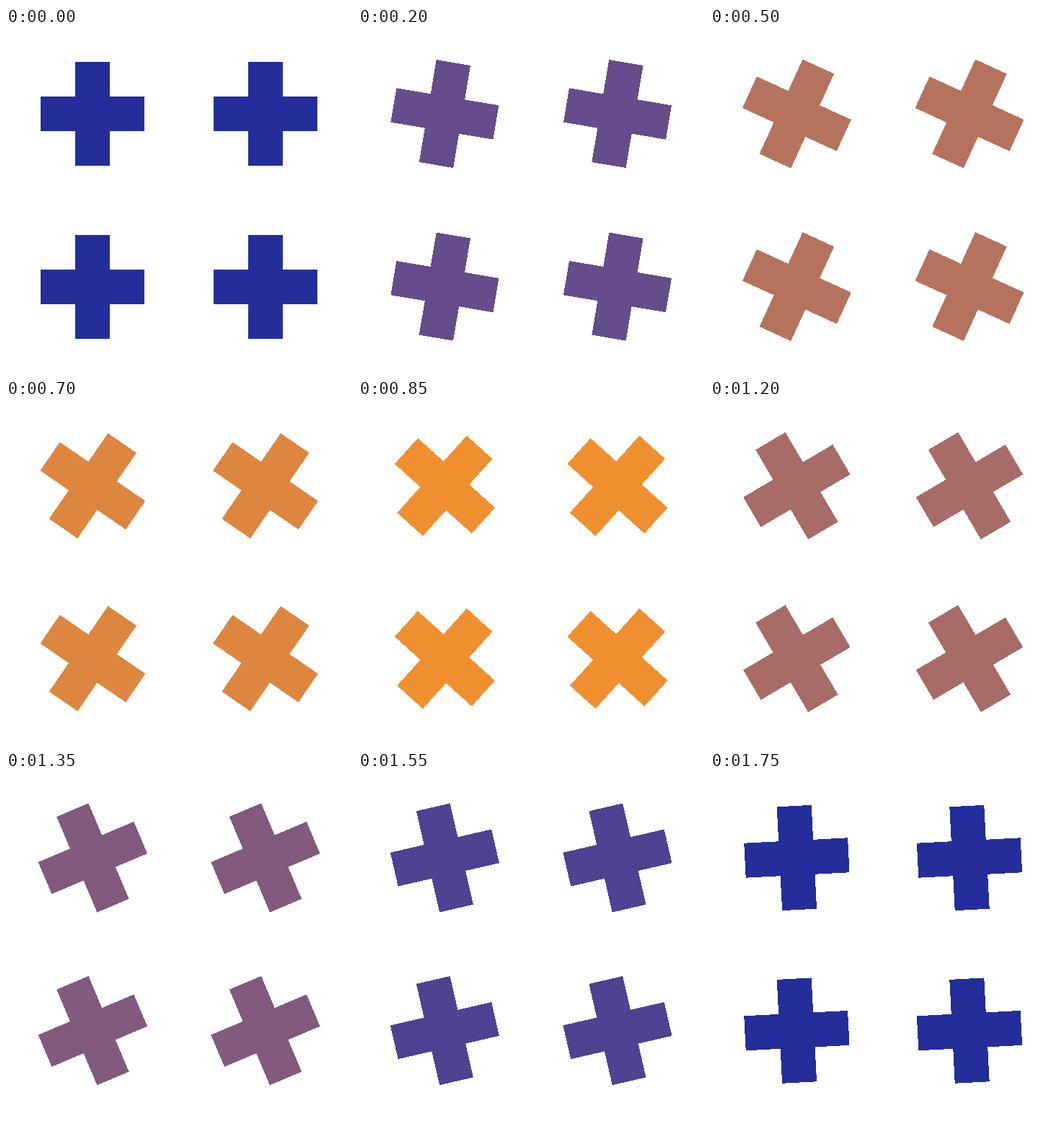
These frames come from a looping animation (480 by 477 pixels, 1.8 s). An HTML page:

```html
<!DOCTYPE html>
<html lang="en">
<head>
<meta charset="utf-8">
<title>Turning crosses</title>
<style>
  html, body { margin: 0; width: 100%; height: 100%; overflow: hidden; background: #fff; }
  svg { display: block; width: 100%; height: 100%; }
</style>
</head>
<body>
<svg viewBox="0 0 480 477" shape-rendering="crispEdges">
  <defs>
    <path id="cross" d="M-24-72h48v48h48v48h-48v48h-48v-48h-48v-48h48z"/>
  </defs>
  <g id="crosses"></g>
</svg>
<script>
const LOOP = 1800, HALF = LOOP / 2, STEP = 50;
const LEFT = 120.4, TOP = 119, GAP = 239.6;
const group = document.getElementById('crosses');

const mix = (a, b, k) => Math.round(a + (b - a) * k);

// 0 is blue, 1 is orange: a decelerating rise, then a steady fall
function warmth(t) {
  return t < HALF
    ? 1 - (1 - t / HALF) ** 1.5
    : Math.max(0, 1 - 1.1 * (t - HALF) / HALF);
}

function color(k) {
  return `rgb(${mix(35, 243, k)}, ${mix(46, 144, k)}, ${mix(155, 46, k ** 1.6)})`;
}

const crosses = [0, 1, 2, 3].map(i => {
  const use = document.createElementNS('http://www.w3.org/2000/svg', 'use');
  use.setAttribute('href', '#cross');
  group.append(use);
  return { use, x: LEFT + GAP * (i % 2), y: TOP + GAP * (i >> 1) };
});

function draw(t) {
  const angle = Math.max(0, 90 * t / LOOP - 0.45);
  group.setAttribute('fill', color(warmth(t)));
  for (const { use, x, y } of crosses) {
    use.setAttribute('transform', `translate(${x} ${y}) rotate(${angle})`);
  }
}

const start = performance.now();
function frame() {
  const t = (performance.now() - start) % LOOP;
  draw(Math.floor(t / STEP) * STEP);
  requestAnimationFrame(frame);
}
frame();
</script>
</body>
</html>
```
